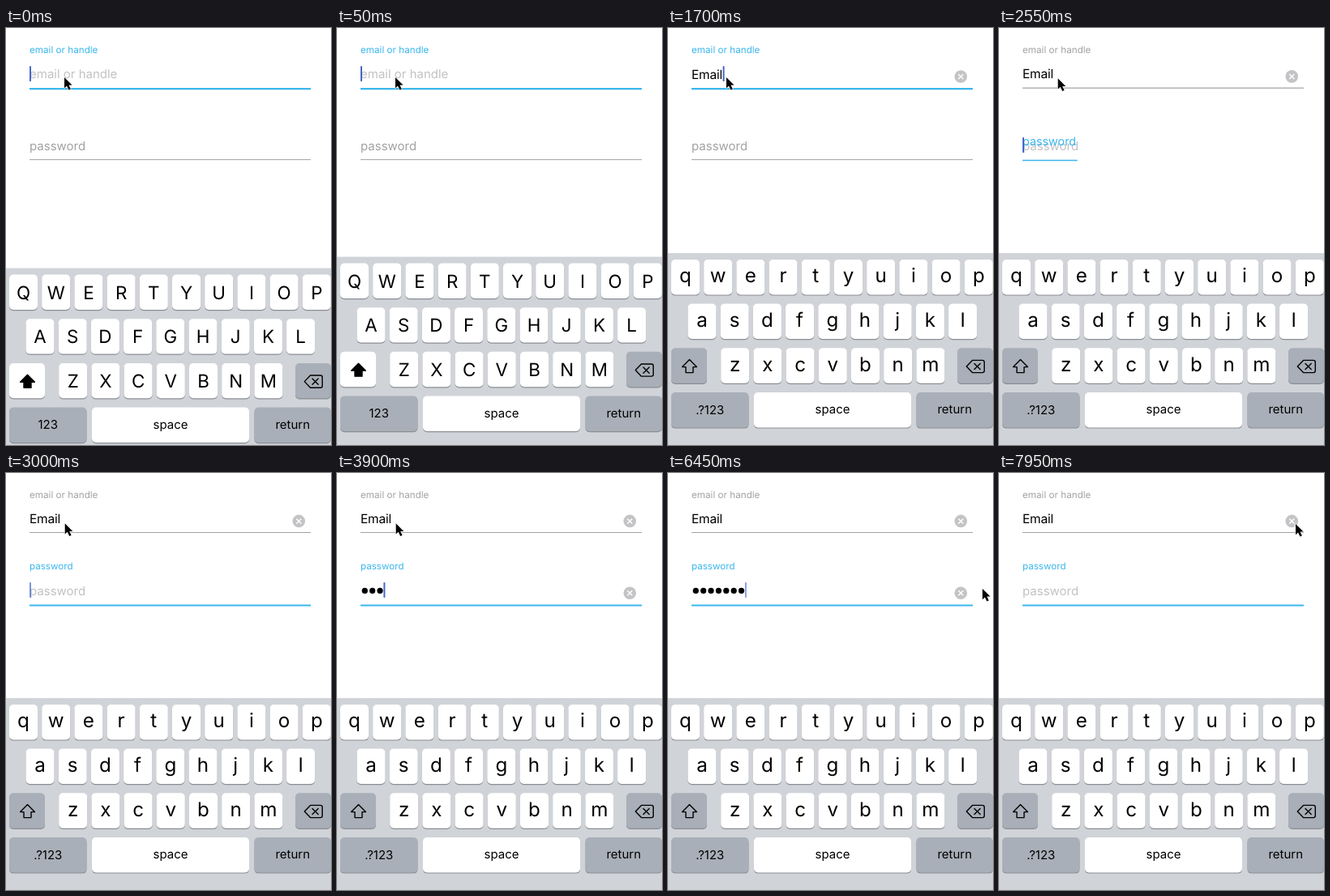
Animation, 401 px wide and 515 px high, one loop 8 s. Source, as an HTML page:

```html
<!DOCTYPE html>
<html lang="en">
<head>
<meta charset="utf-8">
<title>Sign-in form</title>
<style>
html, body { margin: 0; width: 100%; height: 100%; overflow: hidden; background: #fff; }
svg { display: block; width: 401px; height: 515px; font-family: Inter, "Liberation Sans", sans-serif; text-rendering: geometricPrecision; }
.field { font-size: 15px; }
.typed { font-size: 15.5px; letter-spacing: -.2px; }
.small { font-size: 11.7px; }
.hint { fill: #c2c2c5; }
.key text { text-anchor: middle; font-size: 15px; }
.upper text.letter { font-size: 22.4px; }
.lower text.letter { font-size: 24.2px; }
</style>
</head>
<body>
<svg viewBox="0 0 401 515">
  <text id="mailLabel" class="small" x="29" y="31">email or handle</text>
  <text id="mailHint" class="field hint" x="29" y="62">email or handle</text>
  <text id="mailText" class="typed" x="29" y="62"></text>
  <path id="mailLine"/>
  <text id="passHint" class="field hint" x="29" y="150.5">password</text>
  <text id="passLabel" class="field">password</text>
  <path id="passLine"/>
  <g id="dots"></g>
  <g id="mailClear"></g>
  <g id="passClear"></g>
  <rect id="caret" width="2" height="19" rx=".8" fill="#4566cc"/>
  <g id="board">
    <rect y="278" width="401" height="260" fill="#d0d3d8"/>
    <g id="upper" class="upper"></g>
    <g id="lower" class="lower"></g>
  </g>
  <path id="arrow" d="M0 0V13.2L3 10.4L5.5 15.6L7.9 14.5L5.5 9.6H9.6Z" fill="#000" stroke="#fff" stroke-width="1.2" stroke-linejoin="round" paint-order="stroke"/>
</svg>
<script>
const LOOP = 8000, BLUE = '#3ab6ec', GRAY = '#a2a2a2';
const FOCUS = 2466, CLEARED = 7200;
const mailKeys = [1000, 1180, 1320, 1450, 1580];
const passKeys = Array.from({ length: 7 }, (_, i) => 3600 + 140 * i);
const el = {};
document.querySelectorAll('[id]').forEach(n => el[n.id] = n);

const clamp = v => Math.max(0, Math.min(1, v));
const ease = v => v * v * (3 - 2 * v);
const span = (t, a, b) => ease(clamp((t - a) / (b - a)));
const mix = (a, b, p) => a + (b - a) * p;
const set = (node, attrs) => { for (const k in attrs) node.setAttribute(k, attrs[k]); };
const show = (node, on) => set(node, { visibility: on ? 'visible' : 'hidden' });

function key(x, y, w, label, base, dark, cls = '') {
  const box = (dy, fill) => `<rect x="${x}" y="${y + dy}" width="${w}" height="43.4" rx="5" fill="${fill}"/>`;
  return `<g class="key">${box(1.2, '#8b8e93')}${box(0, dark ? '#a9afb8' : '#fff')}` +
    `<text class="${cls}" x="${x + w / 2}" y="${y + base}">${label}</text></g>`;
}

function keyboard(upper) {
  let out = '';
  const rows = [['qwertyuiop', 4, 286], ['asdfghjkl', 24.5, 340.6], ['zxcvbnm', 65.2, 395.3]];
  for (const [letters, x, y] of rows)
    [...letters].forEach((c, i) => {
      out += key(x + i * 40.2, y, 35, upper ? c.toUpperCase() : c, upper ? 30.2 : 28.2, false, 'letter');
    });
  out += key(4, 395.3, 44, '', 0, !upper);
  out += `<path d="M26.5 409.6L35.4 418.6H31V425.6H22V418.6H17.6Z" fill="${upper ? '#000' : 'none'}" stroke="#000" stroke-width="1.4" stroke-linejoin="round"/>`;
  out += key(357, 395.3, 44, '', 0, true);
  out += '<path d="M375.5 410.4H388Q390.3 410.4 390.3 412.7V423.3Q390.3 425.6 388 425.6H375.5L368.3 418Z' +
    'M378 414.4L385.2 421.6M385.2 414.4L378 421.6" fill="none" stroke="#000" stroke-width="1.4" stroke-linecap="round" stroke-linejoin="round"/>';
  out += key(4, 450, 95.5, upper ? '123' : '.?123', 26.7, true);
  out += key(106, 450, 194, 'space', 26, false);
  out += key(306.5, 450, 94.5, 'return', 26, true);
  return out;
}

el.upper.innerHTML = keyboard(true);
el.lower.innerHTML = keyboard(false);
el.dots.innerHTML = passKeys.map((_, i) => `<circle cx="${34.3 + i * 9.38}" cy="145.4" r="3.6"/>`).join('');
el.mailClear.innerHTML = el.passClear.innerHTML =
  '<circle r="7.8" fill="#c4c4c7"/><path d="M-3 -3L3 3M3 -3L-3 3" stroke="#fff" stroke-width="1.4"/>';
set(el.passClear, { transform: 'translate(361.3 148.2)' });

// Solid after each reset, then a one-second blink with short fades.
function blink(ms) {
  const s = ms / 1000, m = s % 1;
  if (s >= 1 && m < .05) return .5 + m * 10;
  if (m < .5) return 1;
  return m < .75 ? clamp(1 - (m - .5) / .12) : clamp((m - .95) / .1);
}

function caret(t, mail, dots) {
  let x = 29, y = 47, reset = -200;
  if (t < FOCUS) {
    if (mail) {
      x += el.mailText.getComputedTextLength() + .5;
      reset = mailKeys[mail - 1];
    }
  } else {
    y = 135;
    reset = FOCUS;
    if (t >= CLEARED) reset = CLEARED;
    else if (dots) {
      x = 29.3 + dots * 9.38;
      reset = passKeys[dots - 1];
    }
  }
  set(el.caret, { x, y, opacity: blink(t - reset) });
}

function pointer(t) {
  const moves = [[2300, 2450, 72.7, 62.3], [5400, 6450, 388, 143], [6550, 6950, 364, 142], [7250, 7850, 366, 63]];
  let x = 72, y = 61;
  for (const [a, b, tx, ty] of moves) {
    const p = span(t, a, b);
    x = mix(x, tx, p);
    y = mix(y, ty, p);
  }
  set(el.arrow, { transform: `translate(${x} ${y})` });
}

function draw(t) {
  const mail = mailKeys.filter(k => t >= k).length;
  const dots = t < CLEARED ? passKeys.filter(k => t >= k).length : 0;
  const onPass = t >= FOCUS;
  const p = span(t, FOCUS, FOCUS + 300);

  set(el.board, { transform: `translate(0 ${19 * (1 - clamp(t / 100)) ** 2})` });
  show(el.upper, !mail);
  show(el.lower, mail);

  el.mailText.textContent = 'Email'.slice(0, mail);
  show(el.mailHint, !mail);
  show(el.mailClear, mail);
  set(el.mailLabel, { fill: onPass ? GRAY : BLUE, y: 30.9 - .4 * p });
  set(el.mailText, { y: 62.5 - .5 * p });
  set(el.mailClear, { transform: `translate(361.3 ${60 - .6 * p})` });
  set(el.mailLine, {
    d: `M29 ${onPass ? 74.2 - .7 * p : 75.2}H376`,
    stroke: onPass ? GRAY : BLUE,
    'stroke-width': onPass ? 1.4 - .4 * p : 2.2
  });

  show(el.passHint, onPass && !dots);
  show(el.passClear, dots);
  set(el.passLabel, {
    fill: onPass ? BLUE : GRAY,
    transform: `translate(29 ${mix(151, 119.3, p)}) scale(${mix(1, 11.6 / 15, p)})`
  });
  set(el.passLine, {
    d: onPass ? `M29 163.5H${29 + 347 * p}` : 'M29 162.6H376',
    stroke: onPass ? BLUE : GRAY,
    'stroke-width': onPass ? 1.2 + .8 * p : 1
  });
  [...el.dots.children].forEach((d, i) => show(d, i < dots));

  caret(t, mail, dots);
  pointer(t);
}

const start = performance.now();
function tick() {
  draw((performance.now() - start) % LOOP);
  requestAnimationFrame(tick);
}
tick();
</script>
</body>
</html>
```
